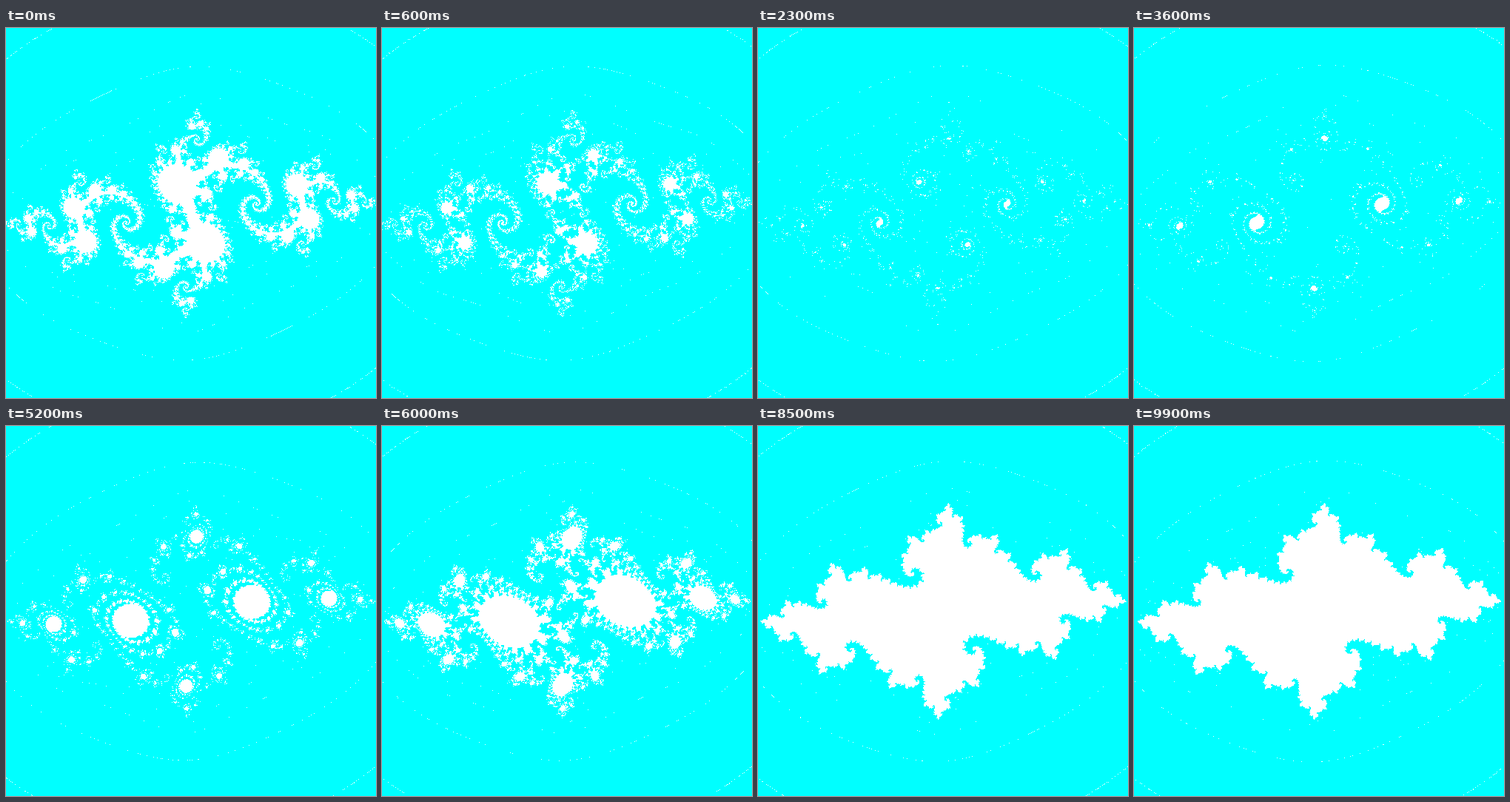
Recreate the animation shown at these times as an HTML page with a canvas. Size 500 by 500 pixels, loop 10 s.

```html
<!DOCTYPE html>
<html lang="en">
<head>
<meta charset="utf-8">
<title>Julia set</title>
<style>
  html, body { margin: 0; width: 100%; height: 100%; overflow: hidden; background: #0ff; }
  canvas { display: block; width: 500px; height: 500px; }
</style>
</head>
<body>
<canvas id="stage" width="500" height="500"></canvas>
<script>
const SIZE = 500, STEPS = 100, STEP_MS = 100, LIMIT = 80;
const WHITE = 0xffffffff, CYAN = 0xffffff00; // ABGR

const ctx = document.getElementById('stage').getContext('2d');
const image = ctx.createImageData(SIZE, SIZE);
const pixels = new Uint32Array(image.data.buffer);

// Iterate z² + c until the doubles overflow. Points where only one
// component overflows stay white, which leaves the dotted contours.
function shade(x, y, cx, cy) {
  for (let n = 0; n < LIMIT; n++) {
    const a = x * x - y * y;
    const b = x * y + y * x;
    if ((a - a) + (b - b) !== 0) {
      return isFinite(a) || isFinite(b) ? WHITE : CYAN;
    }
    x = a + cx;
    y = b + cy;
  }
  return WHITE;
}

const coord = i => (i - SIZE / 2) * 3 / SIZE;

function render(step) {
  const cx = -0.8 + step / 1000, cy = 0.156;
  for (let j = 0, p = 0; j < SIZE; j++) {
    const y = coord(j);
    for (let i = 0; i < SIZE; i++) pixels[p++] = shade(coord(i), y, cx, cy);
  }
  ctx.putImageData(image, 0, 0);
}

let shown = -1;
function tick() {
  const step = Math.floor(performance.now() / STEP_MS) % STEPS;
  if (step !== shown) render(shown = step);
  requestAnimationFrame(tick);
}
tick();
</script>
</body>
</html>
```
